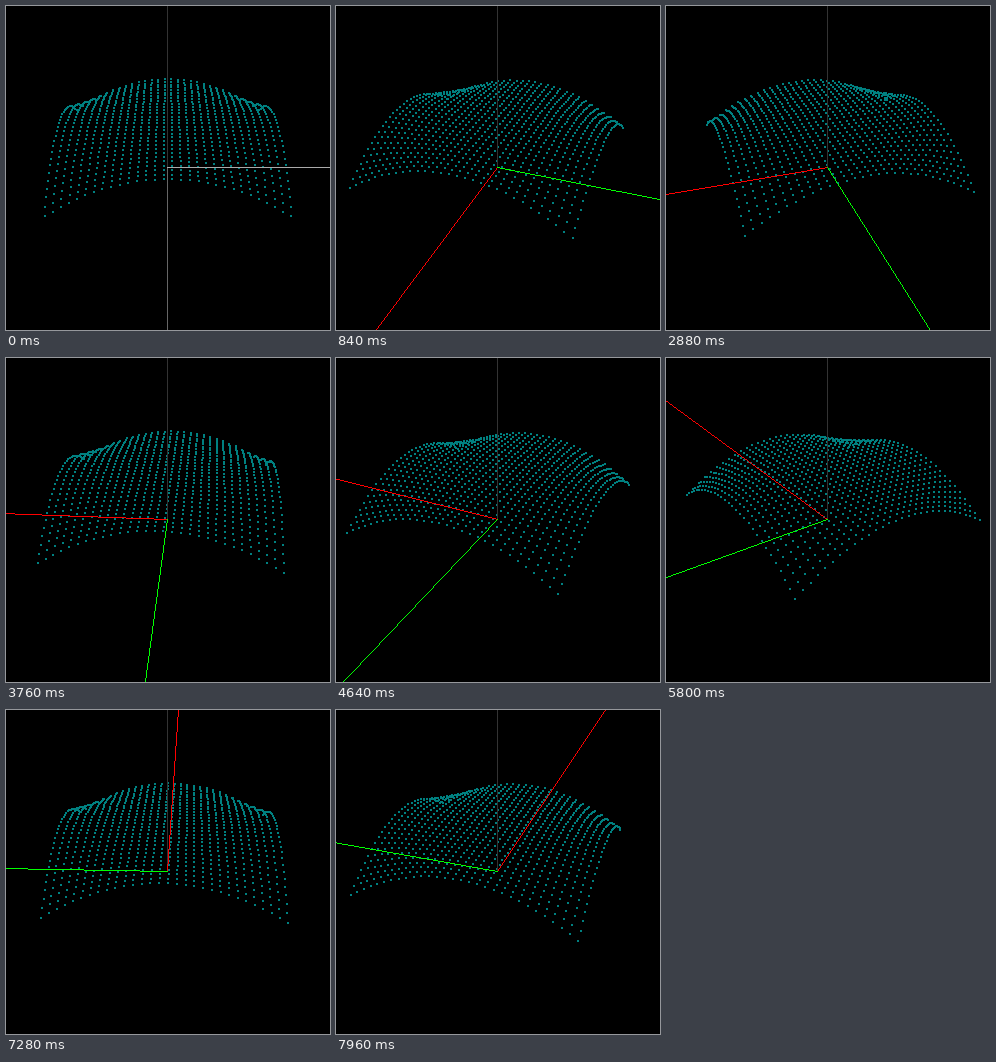
An HTML page with a canvas that plays this animation: 324x324 px, repeating every 8 s.

```html
<!DOCTYPE html>
<html lang="en">
<head>
<meta charset="utf-8">
<title>Rotating surface</title>
<style>
  html, body { margin: 0; width: 100%; height: 100%; overflow: hidden; background: #000; }
  canvas { display: block; width: 324px; height: 324px; image-rendering: pixelated; }
</style>
</head>
<body>
<canvas id="stage" width="324" height="324"></canvas>
<script>
const ctx = document.getElementById('stage').getContext('2d');
const SIZE = 324, MID = SIZE / 2;
const LOOP = 8000, STEP = 40;
const GRID = 30;

// Camera at (5, 0, 3) looking at the origin, 30 degree field of view
const DIST = Math.hypot(5, 3);
const SIN = 3 / DIST, COS = 5 / DIST;
const FOCAL = MID / Math.tan(Math.PI / 12);

const height = (u, v) => 0.499 - 0.356 * u * u * v * v;

// right and near lie in the ground plane, up is vertical
function project(right, near, up) {
  const scale = FOCAL / (DIST - COS * near - SIN * up);
  return [MID + scale * right, MID + scale * (SIN * near - COS * up)];
}

function drawSurface(cos, sin) {
  ctx.fillStyle = '#008080';
  for (let i = 0; i < GRID; i++) {
    for (let j = 0; j < GRID; j++) {
      const u = 2 * i / (GRID - 1) - 1;
      const v = 2 * j / (GRID - 1) - 1;
      const [x, y] = project(u * cos - v * sin, u * sin + v * cos, height(u, v));
      ctx.fillRect(Math.round(x) - 1, Math.round(y) - 1, 2, 2);
    }
  }
}

// Hard-edged one pixel ray from the centre to the edge of the stage
function drawRay(dx, dy, color) {
  const longest = Math.max(Math.abs(dx), Math.abs(dy));
  ctx.fillStyle = color;
  for (let i = 0; i <= MID; i++) {
    ctx.fillRect(Math.round(MID - 1 + i * dx / longest),
                 Math.round(MID - 1 + i * dy / longest), 1, 1);
  }
}

function draw(step) {
  const angle = step * Math.PI / 180;
  const cos = Math.cos(angle), sin = Math.sin(angle);
  const muted = step === 0;
  ctx.fillStyle = '#000';
  ctx.fillRect(0, 0, SIZE, SIZE);
  drawSurface(cos, sin);
  drawRay(0, -1, '#333');
  drawRay(-sin, cos * SIN, muted ? '#666' : '#f00');
  drawRay(cos, sin * SIN, muted ? '#aaa' : '#0f0');
}

const start = performance.now();
let shown = -1;

function tick() {
  const time = Math.max(0, performance.now() - start) % LOOP;
  const step = Math.floor(time / STEP);
  if (step !== shown) draw(shown = step);
  requestAnimationFrame(tick);
}
tick();
</script>
</body>
</html>
```
